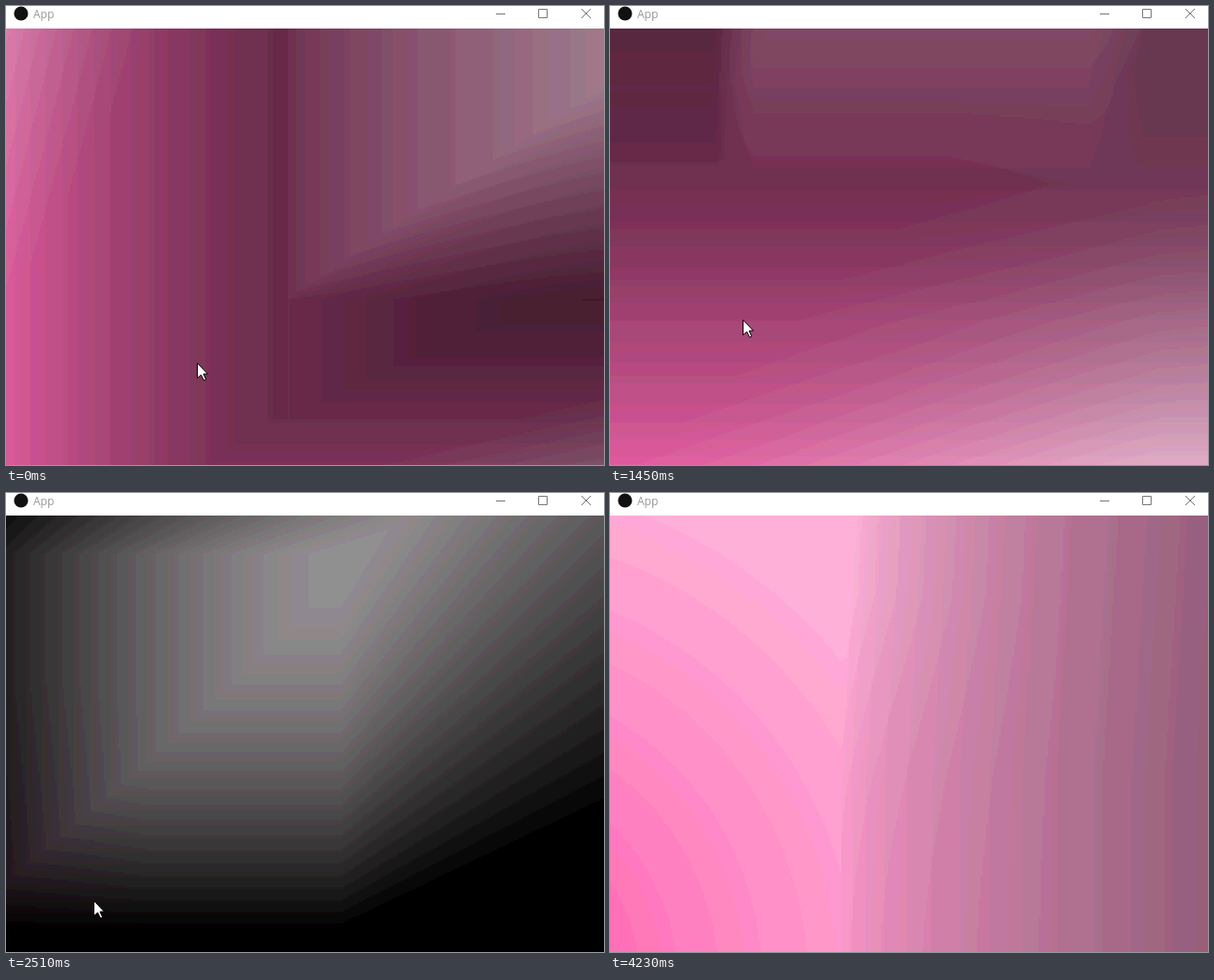
Write an HTML page with a canvas that moves like this. It is 636 px wide and 489 px high and loops after 5190 ms.

```html
<!DOCTYPE html>
<html lang="en">
<head>
<meta charset="utf-8">
<title>App</title>
<style>
  html, body { margin: 0; width: 100%; height: 100%; overflow: hidden; background: #fff; }
  canvas { position: absolute; left: 0; top: 0; display: block; }
  #title { position: absolute; left: 29px; top: 0; font: 12px/18px "Open Sans", "Noto Sans", sans-serif; color: #999; }
</style>
</head>
<body>
<canvas id="stage" width="636" height="489"></canvas>
<div id="title">App</div>
<script>
const W = 636, H = 489, BAR = 24, LOOP = 5190, STEP = 130, CELL = 2;
const PAN_X = 3.5, PAN_Y = 5;
const ctx = document.getElementById('stage').getContext('2d');
const view = document.createElement('canvas');
view.width = W / CELL;
view.height = Math.ceil((H - BAR) / CELL);
const viewCtx = view.getContext('2d');
const image = viewCtx.createImageData(view.width, view.height);

const clamp = v => v < 0 ? 0 : v > 1 ? 1 : v;
const mix = (a, b, k) => a + (b - a) * k;
const smooth = u => u * u * (3 - 2 * u);

// Goes from a at t0 to b at t1 along a power curve.
const curve = (t, t0, a, t1, b, power = 1) =>
  mix(a, b, clamp((t - t0) / (t1 - t0)) ** power);

// Each field gives [brightness, whiteness] of the pink light at a point.
function corner(x, y) {
  const low = curve(y, 310, .265, H, .49, 1.2);
  if (x < 300) {
    const side = curve(x, 300, .41, 0, .85, 1.35);
    return [Math.max(side, low), .29 * clamp(1 - x / 160 - (y - BAR) / 300)];
  }
  const floor = curve(x, W, .265, 300, .42, 1.7);
  if (y > 312) {
    return [Math.max(floor, low), .4 * clamp((x - 400) / 236 + (y - H) / 80)];
  }
  const edge = 310 - .67 * (x - 300);
  const s = clamp((y - edge) / (312 - edge));
  return [
    mix(curve(x, 300, .43, W, .62, .7), floor, s),
    curve(x, 300, .04, W, .62, .7) * (1 - s)
  ];
}

function ground(x, y) {
  if (y > 443) return [1, curve(x, 0, .04, W, .7, .8)];
  if (y > 125) {
    const start = 410 - (y - 125) * 1.1;
    const white = curve(y, 125, .2, 443, .7);
    return [curve(y, 125, .455, 443, 1, 1.5), white * clamp((x - start) / (W - start))];
  }
  const box = .385 + .065 * clamp(Math.max((35 - x) / 25, (y - 75) / 45, (x - 160) / 25));
  const inside = clamp((x - 165) / 40);
  const far = clamp((x - 560) / 60);
  const v = mix(box, curve(y, BAR, .54, 125, .455), inside);
  const w = inside * curve(y, BAR, .27, 125, .2 * clamp((x - 410) / 226));
  return [mix(v, .44, far), mix(w, .26, far)];
}

function plateau(x, y) {
  if (y > 245) {
    return [curve(y, 245, .355, H, .7, 1.55), .44 * clamp((y - 245) / 244 - (W - x) / 386)];
  }
  const v = curve(y, 62, .52, 245, .355, 1.2);
  const w = curve(y, 62, .59, 245, 0, 1.4);
  const left = 135 - Math.max(0, y - 62) * .73;
  if (x < left) {
    const s = clamp(x / left);
    return [mix(curve(y, 120, .21, 245, .35), v, s), mix(.1, w, s)];
  }
  const right = 405 + Math.max(0, 62 - y) * .92;
  const dark = 406 + (245 - y) * 1.33;
  const s = clamp((x - right) / (dark - right));
  const shade = Math.max(curve(x, W, .24, 405, .35, 1.5), curve(y, 130, .24, 245, .345));
  return [mix(v, shade, s), w * (1 - s)];
}

// The contours fan out above the kink and to the right of the peak.
function lobe(x, y, kink = 65) {
  const rise = Math.max(0, kink - y), run = Math.max(0, x - 356);
  const across = (x - 1.06 * rise) / (1 + .0071 * rise);
  const down = (y + 2.04 * run) / (1 + .0034 * run);
  const v = Math.min(curve(across, 356, .58, -60, 0, 1.6), curve(down, 80, .58, 465, 0, 1.8));
  return [v, .94 - .5 * clamp((y - 200) / 250) * clamp(1 - x / 150)];
}

const lowLobe = (x, y) => lobe(x - 8 * PAN_X, y - 21 * PAN_Y, 34);

function wedge(x, y) {
  const dark = curve(x, W, .28, 0, .94, 2.1);
  if (x < 345) return [dark, .35 * clamp(1 - (y - BAR) / 300 - x / 330)];
  const edge = 243 - .57 * (x - 345);
  const s = clamp((y - edge) / (244 - edge));
  return [
    mix(dark, curve(x, 345, .43, W, .63, .55), s),
    curve(x, 345, .04, W, .48, .55) * s
  ];
}

function rings(x, y) {
  const r = Math.hypot(Math.min(x, 245) + 150, (y - 520) * .97);
  const w = curve(r, 150, .02, 560, .49, .85);
  const lean = .06 * Math.max(0, 300 - y);
  return [curve(x - lean, 245, 1, W, .585, .65), curve(x, 245, w, 495, .38)];
}

// Time, pointer tip and light field of each pose.
const poses = [
  { t: 0, x: 203, y: 380, field: corner },
  { t: 1030, x: 156, y: 321, field: ground },
  { t: 1730, x: 106, y: 365, field: plateau },
  { t: 2510, x: 93, y: 434, field: lobe },
  { t: 3030, x: 101, y: 455, field: lowLobe },
  { t: 3710, x: 257, y: 488, field: wedge },
  { t: 3850, x: 297, y: 484, field: rings }
];
const POINTER_END = 4230;

const level = c => Math.min(255, Math.round(c / 8) * 8);

function paintLight(a, b, k, px, py) {
  const data = image.data;
  const sample = (pose, x, y) =>
    pose.field(x - PAN_X * (px - pose.x), y - PAN_Y * (py - pose.y));
  let i = 0;
  for (let row = 0; row < view.height; row++) {
    const y = BAR + (row + .5) * CELL;
    for (let col = 0; col < view.width; col++) {
      const x = (col + .5) * CELL;
      let [v, w] = sample(a, x, y);
      if (k > 0) {
        const [v2, w2] = sample(b, x, y);
        v = mix(v, v2, k);
        w = mix(w, w2, k);
      }
      data[i++] = level(255 * v);
      data[i++] = level(mix(105, 255, w) * v);
      data[i++] = level(mix(180, 255, w) * v);
      data[i++] = 255;
    }
  }
  viewCtx.putImageData(image, 0, 0);
  ctx.imageSmoothingEnabled = false;
  ctx.drawImage(view, 0, BAR, view.width * CELL, view.height * CELL);
}

function paintBar() {
  ctx.fillStyle = '#fff';
  ctx.fillRect(0, 0, W, BAR);
  ctx.fillStyle = '#111';
  ctx.beginPath();
  ctx.arc(16, 8, 7.5, 0, Math.PI * 2);
  ctx.fill();
  ctx.strokeStyle = '#777';
  ctx.lineWidth = 1;
  ctx.stroke(new Path2D('M521 8.5H531M566.5 3.5h9v9h-9zM612 3L622 13M622 3L612 13'));
}

const arrow = new Path2D('M0 0V16L4 12.5L7 18.5L9.2 17.5L6.5 11.5H11Z');

function paintPointer(x, y) {
  ctx.save();
  ctx.translate(Math.round(x) + .5, Math.round(y) + .5);
  ctx.fillStyle = '#fff';
  ctx.strokeStyle = '#000';
  ctx.fill(arrow);
  ctx.stroke(arrow);
  ctx.restore();
}

let shown = '';
function frame() {
  const now = performance.now() % LOOP;
  let i = poses.length - 1;
  while (poses[i].t > now) i--;
  const a = poses[i], b = poses[i + 1] || a;

  // Every move advances in even steps, starting slowly.
  const span = b.t - a.t;
  const steps = Math.round(span / STEP);
  const u = span ? Math.floor((now - a.t) / span * steps) / steps : 0;
  const pointer = now < POINTER_END;
  const key = [i, u, pointer].join();
  if (key !== shown) {
    shown = key;
    const k = smooth(u * u);
    const x = mix(a.x, b.x, k), y = mix(a.y, b.y, k);
    paintLight(a, b, k, x, y);
    paintBar();
    if (pointer) paintPointer(x, y);
  }
  requestAnimationFrame(frame);
}
frame();
</script>
</body>
</html>
```
